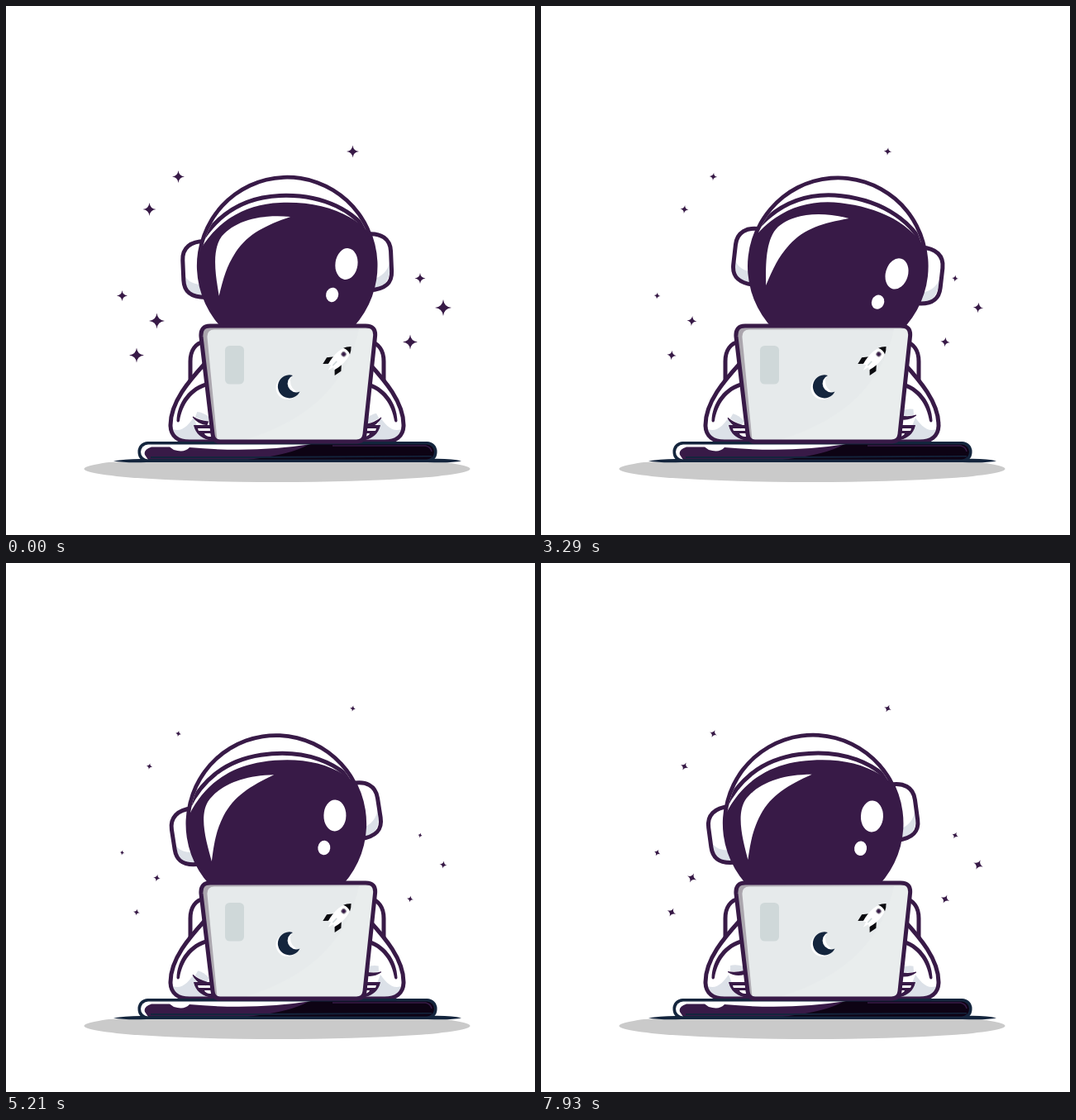
Write an HTML page that moves like this. It is 640 px wide and 640 px high and loops after 8000 ms.

```html
<!DOCTYPE html>
<html lang="en">
<head>
<meta charset="utf-8">
<title>Astronaut at a laptop</title>
<style>
  html, body { margin: 0; width: 100%; height: 100%; overflow: hidden; background: #fff; }
  svg { display: block; width: 100vw; height: 100vh; }
  .line { fill: none; stroke: #381a47; stroke-width: 5; stroke-linecap: round; stroke-linejoin: round; }
  .body { fill: #fff; }
  .ink { fill: #381a47; }
  .shade { fill: #dce1e8; }
  .navy { fill: #14253d; }
</style>
</head>
<body>
<svg viewBox="0 0 640 640">
  <defs>
    <clipPath id="dome"><circle cx="345.5" cy="314" r="104.5"/></clipPath>
    <clipPath id="floor"><path d="M80 551.5H580V590H80Z"/></clipPath>
    <clipPath id="slab"><rect x="163" y="530.5" width="355" height="18" rx="9"/></clipPath>
    <clipPath id="lid"><path id="lidShape" d="M247 387H435Q448 387 446.500 400L434 518Q433 527 424 527H259Q251 527 250 518L236 400Q235 387 247 387Z"/></clipPath>
    <linearGradient id="bezel"><stop offset="0" stop-color="#a9a4ac"/><stop offset=".9" stop-color="#d9dcde"/></linearGradient>
    <g id="arm">
      <path class="line body" d="M240 406C229 408 223 417 223 430V453L245 450"/>
      <path class="body" d="M241 432C222 453 199 479 199 507C199 521 209 527 222 527H256V432Z"/>
      <path class="shade" d="M202 512C212 516 220 508 227 498L231 508Q232 519 242 525H215Q204 523 202 512Z"/>
      <path class="line" d="M241 432C222 453 199 479 199 507C199 521 209 527 222 527H256"/>
      <path class="ink" d="M244 455C222 460 207 480 206.500 502Q208 505 210 502C213 482 225 465 244 460Z"/>
      <path class="ink" d="M227 507H254V525H245Q230 521 227 507Z"/>
      <path class="body" d="M232 511H254V514H233ZM240 517H254V521H246Q241 520 240 517Z"/>
    </g>
    <g id="finger">
      <path class="shade" d="M229 487Q236 485 245 488V494H229Z"/>
      <path class="ink" d="M226 494Q235 496 246 493V498Q235 501 226 495Z"/>
    </g>
  </defs>

  <ellipse cx="328" cy="560" rx="233.500" ry="16" fill="#cacaca" clip-path="url(#floor)"/>
  <g id="stars" class="ink"></g>

  <g id="head">
    <g id="ears">
      <path class="body" d="M248 280C230 279 219.500 287 219.500 302V326C219.500 341 228 348 248 348Z"/>
      <path class="shade" d="M221 321C227 331 236 333 248 332V346H238Q221 343 221 321Z"/>
      <path class="line" d="M248 280C230 279 219.500 287 219.500 302V326C219.500 341 228 348 248 348"/>
      <path class="body" d="M443 280C461 279 471.500 287 471.500 302V326C471.500 341 463 348 443 348Z"/>
      <path class="shade" d="M470 314C467 326 459 333 447 335V346H453Q470 343 470 314Z"/>
      <path class="line" d="M443 280C461 279 471.500 287 471.500 302V326C471.500 341 463 348 443 348"/>
    </g>
    <circle class="ink" cx="345.5" cy="314" r="109.3"/>
    <g clip-path="url(#dome)">
      <path class="body" d="M230 200H460V302C442 258 395 237.500 340 237.500C295 237.500 260 258 237 297Z"/>
      <path class="line" d="M240 284C264 247 298 229 340 229C390 229 434 250 453 291"/>
    </g>
    <path class="body" d="M352 255C315 250 285 257 268 275C254 292 259 325 261.500 347C268 325 272 312 284 295C300 273 322 264 352 255Z"/>
    <ellipse class="body" cx="417.300" cy="315" rx="13.500" ry="19" transform="rotate(10 417 315)"/>
    <ellipse class="body" cx="398.500" cy="351.500" rx="7.500" ry="8.800" transform="rotate(15 398 351)"/>
  </g>

  <use href="#arm"/>
  <use href="#finger" id="left"/>
  <g transform="translate(680) scale(-1 1)">
    <use href="#arm"/>
    <use href="#finger" id="right"/>
  </g>

  <path class="navy" d="M130 550.500Q145 547.500 170 548H510Q538 547 551 550.500Q540 553 510 552H170Q145 553 130 550.500Z"/>
  <rect x="161.500" y="529" width="358" height="21" rx="10" fill="#381a47" stroke="#14253d" stroke-width="4"/>
  <g clip-path="url(#slab)">
    <path d="M370 528H525V552H260Q345 546 370 528Z" fill="#0d0314"/>
    <path class="body" d="M160 530H369Q300 541 222 534Q216 541 203 537L198 533.500H176Q166 537 168 543L172 549H160Z"/>
    <path d="M175 545H300L515 544V545.500L300 547H175Z" fill="#14253d"/>
    <path d="M395 532H507Q514 533 515 539" fill="none" stroke="#381a47" stroke-width="1.500"/>
  </g>

  <use href="#lidShape" fill="url(#bezel)"/>
  <g clip-path="url(#lid)">
    <path fill="#e6eaeb" d="M252 391.500H450L435 530H256L243.500 401Q243 391.500 252 391.500Z"/>
    <path fill="#e9eded" d="M427 391H450L435 530H270C350 510 410 470 427 391Z"/>
  </g>
  <use href="#lidShape" class="line"/>
  <rect x="265" y="411" width="23" height="46.500" rx="5.500" fill="#cfd8d9"/>
  <path class="body" d="M345 447A14 14 0 1 0 354 467L351 464A14 14 0 0 1 346 447Z" transform="translate(-1 1.500)"/>
  <path class="navy" d="M347 447A14 14 0 1 0 355.500 466.500A10.500 10.500 0 0 1 347 447Z"/>
  <g transform="translate(403 427) rotate(44)">
    <path d="M-6 2L-12 9L-10 18L-4 12ZM6 2L12 9L10 18L4 12Z" fill="#0c0c10"/>
    <path class="body" d="M0 -21C8 -13 9 0 5 14L2 12L0 19L-2 12L-5 14C-9 0 -8 -13 0 -21Z"/>
    <path d="M0 -21Q4 -17 5.500 -13Q0 -15.500 -5.500 -13Q-4 -17 0 -21Z" fill="#0c0c10"/>
    <circle class="ink" cy="-8" r="2.700" stroke="#8d8794"/>
    <path d="M0 4V11" stroke="#cfd8d9" stroke-width="1.500"/>
  </g>
</svg>

<script>
const LOOP = 8000;
const $ = id => document.getElementById(id);

// Keys are [ms, value]
const TILT = [[0, -2.5], [1140, 3], [2350, 7.2], [3290, 6.5], [4500, 0],
              [5210, -8.8], [6100, -12], [6790, -11.7], [7930, -7.7], [8000, -7.4]];
const SPIN = [[0, 0], [4500, 133], [5210, 192], [8000, 205]];
const SIZE = [[0, 1], [4930, .45], [8000, .63]];

const STARS = [[419.5, 176, 7.5], [208.5, 206.5, 7.5], [173.5, 246, 8],
               [140.5, 350.5, 6.5], [182.5, 381, 9.5], [158, 422.5, 9],
               [501, 329.5, 6.5], [529, 365, 10], [489, 406.5, 9]];

const stars = STARS.map(() => {
  const p = document.createElementNS('http://www.w3.org/2000/svg', 'path');
  p.setAttribute('d', 'M0-1Q.1-.1 1 0Q.1 .1 0 1Q-.1 .1-1 0Q-.1-.1 0-1Z');
  $('stars').append(p);
  return p;
});

function segment(keys, t) {
  let i = 0;
  while (i < keys.length - 2 && t >= keys[i + 1][0]) i++;
  return i;
}

function linear(keys, t) {
  const i = segment(keys, t), [t0, a] = keys[i], [t1, b] = keys[i + 1];
  return a + (b - a) * (t - t0) / (t1 - t0);
}

// Cubic Hermite through the keys
function smooth(keys, t) {
  const i = segment(keys, t), [t0, a] = keys[i], [t1, b] = keys[i + 1];
  const slope = k => {
    const p = keys[Math.max(k - 1, 0)], n = keys[Math.min(k + 1, keys.length - 1)];
    return (n[1] - p[1]) / (n[0] - p[0]);
  };
  const d = t1 - t0, u = (t - t0) / d, v = 1 - u;
  return v * v * (1 + 2 * u) * a + u * u * (3 - 2 * u) * b
       + d * u * v * (v * slope(i) - u * slope(i + 1));
}

const pulse = (t, period, peak) =>
  Math.sqrt(Math.max(0, Math.cos(2 * Math.PI * (t / period - peak))));

function pose(el, lift) {
  const drop = 1 - lift;
  el.setAttribute('transform', `translate(${-drop} ${4 * drop}) rotate(${30 * drop} 227 496)`);
}

function draw(t) {
  $('head').setAttribute('transform', `rotate(${smooth(TILT, t)} 345.5 436)`);
  const spin = linear(SPIN, t), size = linear(SIZE, t);
  STARS.forEach(([x, y, r], i) =>
    stars[i].setAttribute('transform', `translate(${x} ${y}) rotate(${spin}) scale(${r * size})`));
  pose($('left'), pulse(t, LOOP / 28, .77));
  pose($('right'), pulse(t, 975, .25));
}

const start = performance.now();
function tick() {
  draw((performance.now() - start) % LOOP);
  requestAnimationFrame(tick);
}
tick();
</script>
</body>
</html>
```
